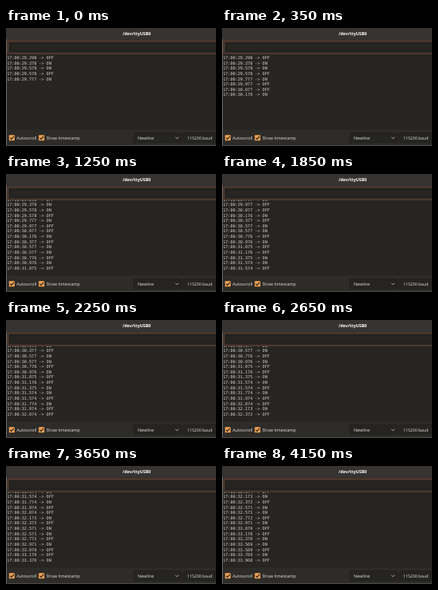
Write an HTML page that moves like this. It is 263 px wide and 148 px high and loops after 4250 ms.

```html
<!DOCTYPE html>
<html lang="en">
<head>
<meta charset="utf-8">
<title>Serial monitor</title>
<style>
  html, body { margin: 0; width: 100%; height: 100%; overflow: hidden; background: #2d2c29; }
  svg { display: block; width: 100%; height: 100%; }
  text { font-family: "Open Sans", "Noto Sans", sans-serif; font-size: 5.4px; font-weight: 500; fill: #e8e6e2; text-rendering: geometricPrecision; white-space: pre; }
  .title { font-weight: 700; fill: #fff; text-anchor: middle; }
  #log text { font-family: "DejaVu Sans Mono", monospace; font-size: 5.13px; font-weight: 400; fill: #d6d5d0; }
  .box { fill: #252422; stroke: #1f1e1c; stroke-width: .7; }
  .tick { fill: none; stroke: #33291f; stroke-width: 1.3; }
</style>
</head>
<body>
<svg viewBox="0 0 263 148" preserveAspectRatio="none">
  <defs>
    <clipPath id="view"><rect x="1" y="33" width="262" height="94"/></clipPath>
    <g id="check">
      <rect width="7.6" height="7.6" rx="1.3" fill="#f0a455" stroke="#1f1e1c" stroke-width=".5"/>
      <path class="tick" d="M1.7 3.9 3.3 5.7 6.3 2"/>
    </g>
  </defs>

  <rect width="263" height="148" fill="#2d2c29"/>
  <rect width="263" height="33" fill="#363330"/>
  <text class="title" x="163.7" y="8.6">/dev/ttyUSB0</text>

  <rect x="2.5" y="16.5" width="270" height="15.5" rx="1.5" fill="#2b2926" stroke="#70432a" stroke-width=".9"/>
  <rect x="5" y="19.5" width="270" height="9.5" fill="#262522" stroke="#1c1a18" stroke-width=".7"/>

  <rect x="1" y="33" width="262" height="94.5" fill="#262522"/>
  <rect y="14" width="1" height="134" fill="#6e6d69"/>
  <rect y="147" width="263" height="1" fill="#4c4b48"/>
  <g clip-path="url(#view)"><g id="log"></g></g>

  <use href="#check" x="3.5" y="133.9"/>
  <text x="13.2" y="139.6">Autoscroll</text>
  <use href="#check" x="40.7" y="133.9"/>
  <text x="50.4" y="139.6">Show timestamp</text>
  <rect class="box" x="160" y="131.5" width="60" height="12.5" rx="1.5"/>
  <text x="165" y="139.6">Newline</text>
  <path d="M212.2 136.8l2 2 2-2" fill="none" stroke="#d0d0d0" stroke-width=".8"/>
  <rect class="box" x="222" y="131.5" width="44" height="12.5" rx="1.5"/>
  <text x="227" y="139.6" style="font-size:5.15px">115200 baud</text>
</svg>
<script>
const LOOP = 4250, PITCH = 6.62, FIRST = 39.1, LAST = 119.8;

// Stamp (seconds past 17:00), state, arrival time in ms
const lines = `29.298 OFF 0
29.378 ON 0
29.578 ON 0
29.578 OFF 0
29.777 ON 0
29.977 OFF 250
30.077 OFF 250
30.176 ON 350
30.377 OFF 550
30.577 ON 750
30.577 ON 850
30.776 OFF 1150
30.976 ON 1150
31.075 OFF 1250
31.176 OFF 1350
31.375 ON 1550
31.574 ON 1750
31.574 OFF 1850
31.774 ON 1950
31.974 OFF 2150
32.074 OFF 2250
32.173 ON 2350
32.372 OFF 2550
32.571 ON 2750
32.571 ON 2750
32.772 OFF 2950
32.971 ON 3150
33.070 OFF 3250
33.170 OFF 3350
33.370 ON 3550
33.569 ON 3750
33.569 OFF 3750
33.769 ON 3950
33.968 OFF 4150`.split("\n").map((row, i) => {
  const [stamp, state, at] = row.split(" ");
  const el = document.createElementNS("http://www.w3.org/2000/svg", "text");
  el.textContent = `17:00:${stamp} -> ${state}`;
  el.setAttribute("x", 1.2);
  el.setAttribute("y", FIRST + i * PITCH);
  return { el, at: +at };
});
const log = document.getElementById("log");
log.append(...lines.map(line => line.el));

const start = performance.now();
function draw(now) {
  const t = Math.max(0, now - start) % LOOP;
  let count = 0;
  for (const { el, at } of lines) {
    const shown = at <= t;
    el.style.display = shown ? "" : "none";
    count += shown;
  }
  // Autoscroll keeps the newest line in view
  const scroll = Math.max(0, FIRST + (count - 1) * PITCH - LAST);
  log.setAttribute("transform", `translate(0 ${-scroll})`);
  requestAnimationFrame(draw);
}
draw(start);
</script>
</body>
</html>
```
